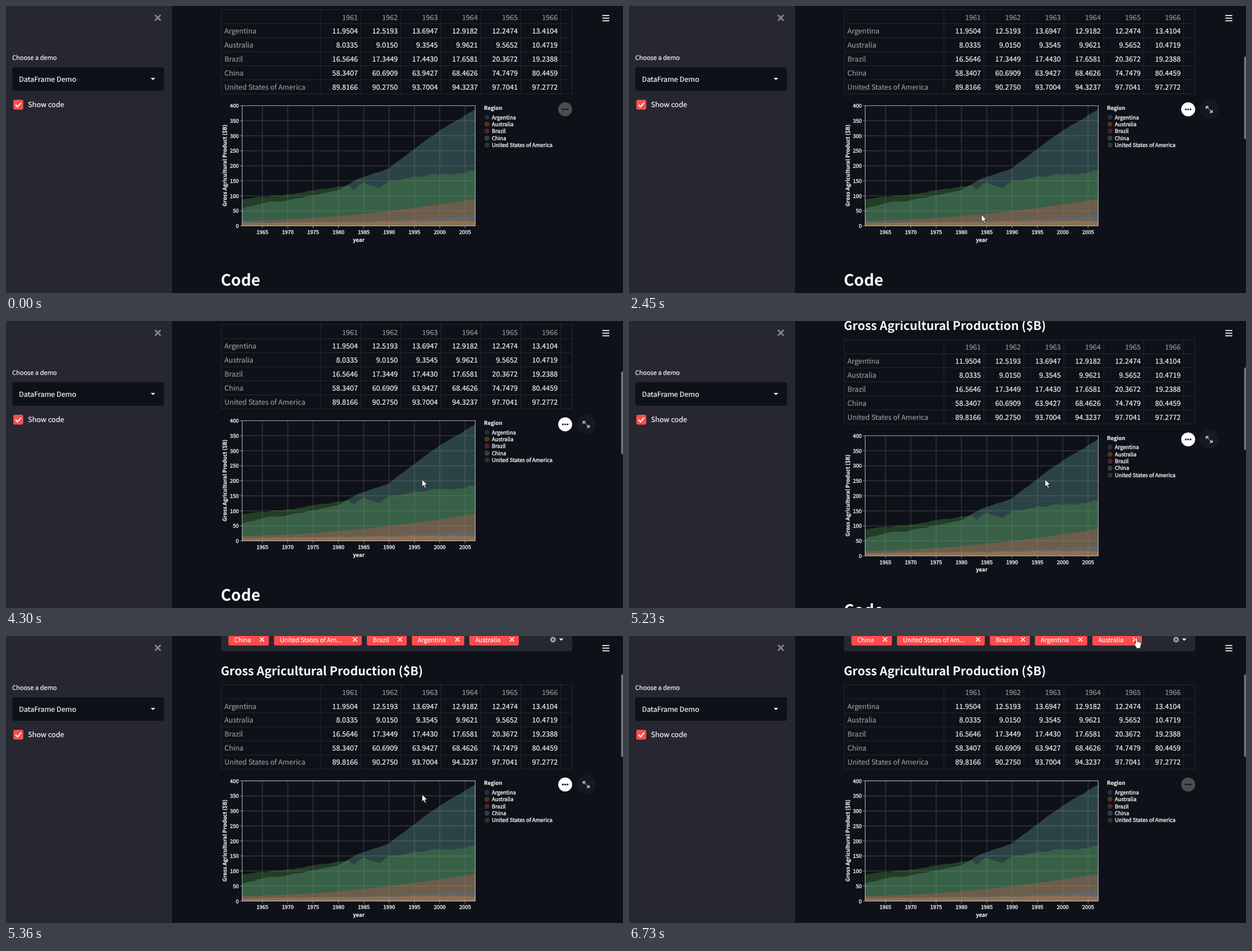
Write an HTML page that moves like this. It is 1096x511 px and loops after 8000 ms.

```html
<!DOCTYPE html>
<html lang="en">
<head>
<meta charset="utf-8">
<title>DataFrame Demo</title>
<style>
html, body { margin: 0; width: 100%; height: 100%; overflow: hidden; background: #0e1117; }
svg { display: block; width: 1096px; height: 511px; }
text {
  font: 12.6px "Noto Sans CJK JP", "Noto Sans CJK SC", "Noto Sans CJK", "Open Sans", sans-serif;
  color: #fafafa; fill: currentColor; stroke: currentColor; stroke-width: .2px;
  white-space: pre; text-rendering: geometricPrecision;
}
.dim { color: #96979b; }
.small { font-size: 11.03px; }
.title { font-size: 21.4px; font-weight: 700; stroke: none; }
.head { font-size: 28px; font-weight: 700; stroke: none; }
.tick { font-size: 9.46px; color: #e6e8ec; stroke-width: .45px; }
.axis { font-size: 9.6px; font-weight: 700; color: #eceef1; }
.end { text-anchor: end; }
.mid { text-anchor: middle; }
</style>
</head>
<body>
<svg id="stage" viewBox="0 0 1096 511" xmlns="http://www.w3.org/2000/svg"></svg>
<script>
const LOOP = 8000, STEP = 68;
const range = (n, fn) => Array.from({ length: n }, (_, i) => fn(i));
const label = (x, y, s, cls = '', more = '') => `<text x="${x}" y="${y}" class="${cls}" ${more}>${s}</text>`;
const box = (x, y, w, h, fill, r = 0) => `<rect x="${x}" y="${y}" width="${w}" height="${h}" rx="${r}" fill="${fill}"/>`;
const disc = (x, y, r, fill, more = '') => `<circle cx="${x}" cy="${y}" r="${r}" fill="${fill}" ${more}/>`;
const line = (d, color, w, more = '') => `<path d="${d}" fill="none" stroke="${color}" stroke-width="${w}" ${more}/>`;
const cross = (x, y, r, color, w) =>
  line(`M${x - r} ${y - r}l${2 * r} ${2 * r}m0 ${-2 * r}l${-2 * r} ${2 * r}`, color, w);
const caret = (x, y) => `<path d="M${x - 4} ${y - 2}h8l-4 4z" fill="#fafafa"/>`;

// Table
const rows = [
  ['Argentina', '11.9504 12.5193 13.6947 12.9182 12.2474 13.4104'],
  ['Australia', '8.0335 9.0150 9.3545 9.9621 9.5652 10.4719'],
  ['Brazil', '16.5646 17.3449 17.4430 17.6581 20.3672 19.2388'],
  ['China', '58.3407 60.6909 63.9427 68.4626 74.7479 80.4459'],
  ['United States of America', '89.8166 90.2750 93.7004 94.3237 97.7041 97.2772']
];

function table() {
  const rules = range(7, r => `M382 ${6.5 + 25 * r}H1006`).join('')
    + [382.5, ...range(7, c => 559.5 + 71 * c), 1005.5].map(x => `M${x} 6.5V156.5`).join('');
  const years = range(6, c => label(625 + 71 * c, 24.6, 1961 + c, 'dim end')).join('');
  const body = rows.map(([name, values], r) => {
    const y = 49.2 + 24.9 * r;
    return label(388, y, name, 'dim') + values.split(' ').map((v, c) => label(625 + 71 * c, y, v, 'end')).join('');
  });
  return line(rules, '#262831', 1) + years + body.join('');
}

// Chart: u runs from 0 to 1 over the 46 years after 1961
const SPAN = 46;
const xOf = year => 419.5 + (year - 1961) * 9;
const yOf = value => 391.5 - value * 0.535;
const noise = i => { const s = Math.sin(i * 12.9898) * 43758.5453; return 2 * (s - Math.floor(s)) - 1; };

// Joins key points [years after 1961, value] with straight lines
const through = keys => (u, i) => {
  const k = Math.max(1, keys.findIndex(p => p[0] >= i));
  const [[a, va], [b, vb]] = [keys[k - 1], keys[k]];
  return va + (vb - va) * (i - a) / (b - a);
};
const china = through([[0, 58], [5, 80], [8, 82], [14, 101], [19, 119], [23, 158], [29, 192], [34, 257], [39, 317], [46, 388]]);
const states = through([[0, 90], [9, 103], [14, 118], [21, 138], [22, 120], [24, 143], [27, 128], [29, 145], [36, 167], [46, 183]]);

// In drawing order, each with its place in the legend
const series = [
  ['China', 3, '#72b7b2', (u, i) => china(u, i) + 1.5 * noise(i)],
  ['United States of America', 4, '#54a24b', (u, i) => states(u, i) + (2 + 4 * u) * noise(i + 7)],
  ['Brazil', 2, '#e45756', u => 17 + 73 * u ** 1.75],
  ['Argentina', 0, '#4c78a8', u => 12 + 22 * u ** 2.5],
  ['Australia', 1, '#f58518', (u, i) => 8 + 9 * u ** 0.7 + 3 * u * noise(i + 3)]
];

function chart() {
  let grid = '', ticks = '', text = '', areas = '', legend = '';
  for (let year = 1965; year <= 2005; year += 5) {
    grid += `M${xOf(year)} 177.5V391.5`;
    ticks += `M${xOf(year)} 391.5v4.5`;
    text += label(xOf(year), 406, year, 'tick mid');
  }
  for (let v = 0; v <= 400; v += 50) {
    if (v % 400) grid += `M419.5 ${yOf(v)}H833.5`;
    ticks += `M419.5 ${yOf(v)}h-4.5`;
    text += label(413.5, yOf(v) + 3.7, v, 'tick end');
  }
  for (const [name, slot, color, value] of series) {
    const top = range(SPAN + 1, i => `L${xOf(1961 + i)} ${yOf(value(i / SPAN, i)).toFixed(1)}`).join('');
    const y = 198 + 12.4 * slot;
    areas += `<path d="M419.5 391.5${top}V391.5z" fill="${color}" fill-opacity=".3"/>`;
    legend += disc(854.4, y, 4.5, color, 'fill-opacity=".3"') + label(863, y + 3.5, name, 'tick');
  }
  return line(grid, '#fff', 1.6, 'stroke-opacity=".14"') + areas + line(ticks, '#808388', 1)
    + line('M419.5 177.5H833.5V391.5H419.5z', '#dfe3e8', 1.1, 'stroke-opacity=".75"') + text + legend
    + label(626.5, 419.5, 'year', 'axis mid') + label(849, 185, 'Region', 'axis')
    + label(0, 0, 'Gross Agricultural Product ($B)', 'axis mid', 'transform="translate(392 284) rotate(-90)"');
}

function buttons() {
  const dots = range(3, i => disc(989.1 + 4.2 * i, 184, 1.6, '#0e1117')).join('');
  const arrows = 'M1025.3 183.2v-4.4h4.4M1025.5 179l4.3 4.3M1036 185v4.4h-4.4M1035.8 189.2l-4.3-4.3';
  return `<g id="more">${disc(993.3, 184, 12.4, '#fff')}${dots}</g>
    <g id="expand">${disc(1030.5, 184, 17.3, '#161920')}${line(arrows, '#c9cacd', 1.5)}</g>`;
}

function chips() {
  const list = [['China', 395, 72], ['United States of Am...', 476, 156], ['Brazil', 641, 71],
    ['Argentina', 721, 93], ['Australia', 823, 88]];
  const tags = list.map(([name, x, w]) => box(x, -89, w, 25.5, '#ff4b4b', 3.5)
    + label(x + 10.5, -69.8, name, 'small') + cross(x + w - 12.2, -74.2, 3.7, '#fff', 1.5));
  return box(382, -110, 624, 57, '#262730', 4) + tags.join('')
    + disc(971.8, -74, 5, '#a3a4a9') + cross(971.8, -74, 1.8, '#262730', 1.3) + caret(986.3, -74);
}

function sidebar() {
  return box(0, 0, 295, 511, '#262730') + cross(269.7, 21, 5, '#85868b', 2.8)
    + label(11, 95.8, 'Choose a demo', 'small')
    + box(11, 109, 269.5, 42, '#0e1117', 4) + label(23, 134.7, 'DataFrame Demo') + caret(261, 130)
    + box(13, 167, 17.6, 17.6, '#f9504e', 3) + line('M17 175.8l3.5 3.7 6.4-7.4', '#fff', 2)
    + label(39, 180.4, 'Show code');
}

const arrowPath = 'M0 0V13.3l3-2.9 2.2 5 2.2-.9-2.2-4.9h4.2z';
const handPath = 'M-1.6 10V1.3a1.6 1.6 0 0 1 3.2 0V6.4l5 1.1q1.8.5 1.6 2.5l-.7 5-1.1 3.6H.6L-3.6 12.2q-1.2-2.2.6-2.6z';
const pointer = (id, d) => `<path id="${id}" d="${d}" fill="#fff" stroke="#111" stroke-width=".9" stroke-linejoin="round"/>`;

document.getElementById('stage').innerHTML =
  `<g id="page">${table()}${chart()}${buttons()}${chips()}
    ${label(381.5, -10.5, 'Gross Agricultural Production ($B)', 'title')}${label(381.5, 498, 'Code', 'head')}</g>`
  + sidebar() + line('M1059.3 16.9h12.4m0 4.7h-12.4m0 4.7h12.4', '#fafafa', 1.8)
  + `<rect id="bar" x="1092.6" width="5" height="147" rx="2" fill="#71737a"/>`
  + pointer('arrow', arrowPath) + pointer('hand', handPath);

// Pointer moves: begin, end, curve control, rest point; each leaves from the last rest point
const entry = [935, 540];
const moves = [
  [540, 1020, [980, 260], [1004, 178]],
  [1550, 2310, [780, 330], [654, 361]],
  [2380, 3060, [578, 394], [491, 375]],
  [3280, 3830, [530, 345], [600, 334]],
  [4040, 4300, [670, 312], [739, 282]],
  [5430, 6000, [800, 200], [904, 60]],
  [6070, 6270, [920, 10], [940, -20]],
  [6410, 6470, [890, 10], [883, 9]],
  [6660, 6730, [895, 6], [901.5, 3.5]]
];

function pointerAt(t) {
  const n = moves.filter(m => t >= m[0]).length - 1;
  if (n < 0) return entry;
  const [start, end, mid, to] = moves[n];
  const from = n ? moves[n - 1][3] : entry;
  const count = Math.round((end - start) / STEP) + 1;
  const u = t >= end ? 1 : Math.min(1, (Math.floor((t - start) / STEP) + 1) / count);
  return [0, 1].map(k => from[k] * (1 - u) ** 2 + 2 * mid[k] * u * (1 - u) + to[k] * u * u);
}

// Three wheel notches
const scrollAt = t => 26.8 * [5230, 5300, 5360].filter(at => t >= at).length;

const el = Object.fromEntries(['page', 'more', 'expand', 'bar', 'arrow', 'hand'].map(id => [id, document.getElementById(id)]));
const show = (node, on) => node.setAttribute('visibility', on ? 'visible' : 'hidden');
const place = (node, x, y) => node.setAttribute('transform', `translate(${x} ${y})`);

function draw(t) {
  const shift = scrollAt(t);
  const [x, y] = pointerAt(t);
  const inside = y >= 0 && y < 511;
  const onChart = y - shift > 170 && y - shift < 430;
  const onMore = onChart && Math.hypot(x - 993.3, y - shift - 184) < 13;
  const onClose = shift > 80 && y < 17 && x > 889 && x < 912;
  const pointing = onMore || onClose;
  place(el.page, 0, shift);
  el.more.setAttribute('opacity', onChart ? 1 : 0.25);
  show(el.expand, onChart);
  show(el.bar, inside);
  el.bar.setAttribute('y', 90 - shift * 0.27);
  show(el.arrow, inside && !pointing);
  show(el.hand, inside && pointing);
  place(el.arrow, x, y);
  place(el.hand, x, y);
}

const begin = performance.now();
function tick() {
  draw((performance.now() - begin) % LOOP);
  requestAnimationFrame(tick);
}
tick();
</script>
</body>
</html>
```
